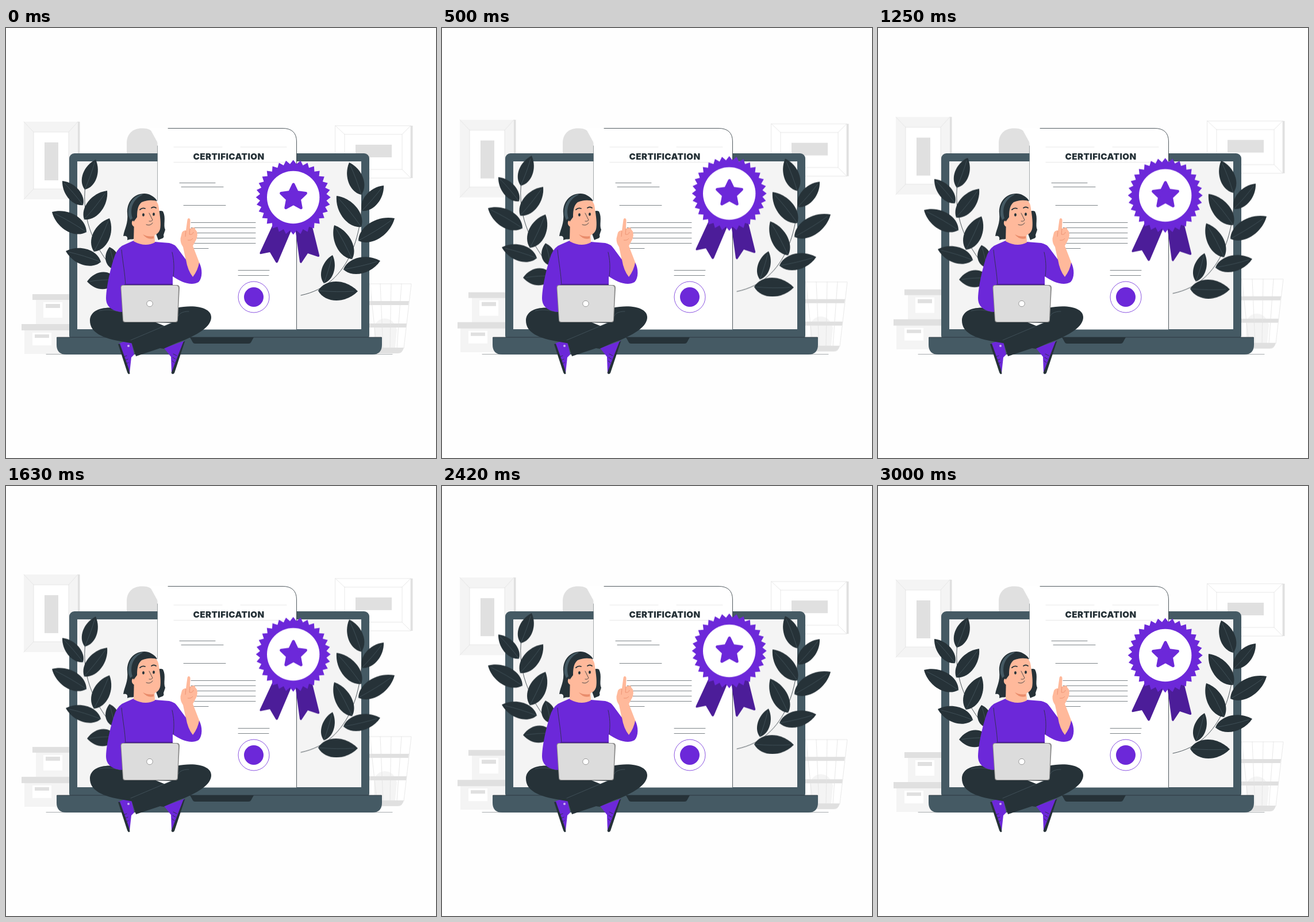
An HTML page for the animation above (3.04 s loop, 748 by 748 pixels).

```html
<!DOCTYPE html>
<html lang="en">
<head>
<meta charset="utf-8">
<title>Certification</title>
<style>
html, body { margin: 0; width: 100%; height: 100%; overflow: hidden; background: #fefefe; }
svg { display: block; width: 100vw; height: 100vh; }
.dark { fill: #263238; }
.slate { fill: #455a64; }
.violet { fill: #6c28d9; }
.deep { fill: #4c1d99; }
.skin { fill: #ffb99b; }
.pale { fill: #f4f4f4; }
.grey { fill: #e0e0e0; }
.white { fill: #fff; }
.ink, .thin, .hair, .brow { fill: none; stroke: #263238; stroke-width: .8; stroke-linecap: round; stroke-linejoin: round; }
.thin { stroke: #e2e2e2; }
.hair { stroke: #51636c; stroke-width: .6; }
.brow { stroke-width: 1.8; }
.faint { stroke-opacity: .5; }
text { font: 900 15.2px Inter, "Open Sans", sans-serif; letter-spacing: .4px; text-anchor: middle; }
</style>
</head>
<body>
<svg viewBox="0 0 748 748">
  <g class="slow">
    <!-- wall pictures -->
    <rect class="grey" x="124" y="163" width="4.5" height="135"/>
    <rect class="pale" x="31" y="163" width="94" height="135"/>
    <rect class="white" x="48" y="181" width="61" height="99"/>
    <path class="thin" d="M31 163L48 181H109L125 163M31 298L48 280V181M109 181V280L125 298M48 280H109"/>
    <rect class="grey" x="67" y="199" width="24" height="66"/>
    <rect class="grey" x="703" y="170" width="4.5" height="91"/>
    <rect class="white" x="573" y="170" width="131" height="91"/>
    <path class="thin" d="M573 170H704V261H573ZL589 185H689V246H589V185M704 170L689 185M573 261L589 246M704 261L689 246"/>
    <rect class="grey" x="608" y="203" width="63" height="22"/>
    <!-- boxes -->
    <path class="pale" d="M52 473H114V516H52ZM32 526H114V567H32Z"/>
    <path class="white" d="M65 477H98V504H65ZM46 530H79V552H46Z"/>
    <path class="grey" d="M46 463H114V473H46ZM27 515H114V526H27ZM69 480H94V487H69ZM50 533H75V539H50Z"/>
    <!-- basket -->
    <path class="white" d="M620 445H705L692 557Q690 566 681 566H620Z"/>
    <path class="pale" d="M640 566V520C644 508 655 503 664 506C673 508 678 517 680 525L676 566Z"/>
    <path class="grey" d="M620 475H701L700 482H620ZM620 514H697L696 521H620ZM620 556H692Q690 566 681 566H620Z"/>
    <path class="thin" d="M620 445H705L692 557M633 445L645 557M651 445L656 557M670 445L668 557M688 445L680 557"/>
  </g>

  <path class="ink faint" d="M70 567.500H672"/>
  <path class="grey" d="M210 224V200C210 184 221 174.500 236 174.500H250L264 200V224Z"/>

  <!-- large laptop -->
  <rect class="slate" x="110" y="218" width="522" height="326" rx="9"/>
  <rect class="pale" x="124" y="232" width="494" height="292"/>
  <path class="slate" d="M88 538H654V551Q654 568 637 568H105Q88 568 88 551Z"/>
  <path class="ink" d="M89 538H653"/>
  <path class="dark" d="M320 538H431L426 547Q425 549 422 549H329Q326 549 325 547Z"/>

  <!-- certificate -->
  <path class="white" d="M236 174H481Q505.500 174 505.500 198V524.500H263.500V201C263 184 252 174 236 174Z"/>
  <path class="ink" d="M282 174.500H481Q505.500 174.500 505.500 198V524"/>
  <path class="ink faint" d="M263.500 300V205"/>
  <path class="thin" d="M292 207H376M408 207H488M292 233.500H488"/>
  <text class="dark" x="387.500" y="228.500">CERTIFICATION</text>
  <path class="ink" stroke-opacity=".75" d="M302 269.500H364M305 276.500H378M309 308.500H382M322 338.500H434M322 347.500H434M322 356.500H434M322 365.500H434M322 374.500H434M322 383.500H352M404 421.500H458M404 430.500H457"/>
  <circle cx="431" cy="468" r="27" fill="none" stroke="#6c28d9" stroke-width=".8"/>
  <circle class="violet" cx="431" cy="468" r="17"/>

  <g class="fast" id="branches">
    <path class="ink" d="M138 275C132 325 147 375 192 426M619 275C623 350 601 447 513 465"/>
  </g>

  <g class="fast">
    <path class="deep" d="M466 338L441.500 391Q441 394 444 393L459 390L469 407Q471 410 473 407L498 348ZM503 348L511 407Q513 411 515 407L525 392L543 398Q546 398 545 395L531 338Z"/>
    <path class="violet" id="rosette"/>
    <circle class="white" cx="499.700" cy="294.500" r="45.700"/>
    <path class="violet" id="star" stroke="#6c28d9" stroke-width="5" stroke-linejoin="round"/>
  </g>

  <!-- shoes and legs -->
  <path class="violet" d="M196 549L217 541L223 568L218 573L215 600H212Z"/>
  <path class="dark" d="M195 550L198 549L214 594L215.500 601Q213 604 211 599Z"/>
  <circle cx="213" cy="553" r="2" fill="#c9b0f2"/>
  <path class="violet" d="M275 557L311 544L292 600H288L287 572Z"/>
  <path class="dark" d="M308.500 546L311.500 544L293 600Q290 604 287.500 600L289 596Z"/>
  <path class="ink" d="M205 572L210 570M207 578L212 576M209 584L213 582M291 567L297 570M290 573L295 576M289 579L293 582"/>
  <path class="dark" d="M203 489C170 482 146 490 146 509C146 530 168 540 205 546L274 558L307 543L280 520Z"/>
  <path class="dark" d="M296 487C330 480 357 487 357 503C357 519 337 531 310 543L226 571L217 543L288 513L200 511V490Z"/>
  <path class="hair" d="M217 543L288 513M162 492C178 488 190 492 199 494M318 493C306 493 301 497 298 503"/>

  <!-- raised arm -->
  <path class="skin" d="M313 352L315.500 334Q316 330.500 318.500 331Q321 332 320.500 336L320 349L326 347Q329 347 329 350L332 354Q334 361 331 368L325 379L337 410L332 440L314 430L312 400L308 381Q303 374 303.500 366L306 356Q308 352 313 352Z"/>
  <path d="M313 353L312 363M320 349L319 359Q325 360 326 355M316 369Q322 370 325 366" fill="none" stroke="#e98c6b" stroke-width=".8"/>

  <!-- shirt -->
  <path class="violet" d="M224 369Q242 380 259 372L284 374Q294 376 299 384L313 403Q316 422 325 433Q334 421 336 408C342 419 342 435 335 442C323 449 306 443 290 432V455H202V494C188 493 174 487 174 470C175 446 183 413 190 394Q196 380 208 376Z"/>
  <path class="ink" d="M201 386C203 407 207 426 208 449M291 432C293 415 292 403 289 390"/>
  <path class="deep" d="M207 445H290V450H203Z"/>

  <!-- head -->
  <path class="dark" d="M241 288C221 288 210 304 211 322C213 340 206 349 204 362C210 361 212 363 211 369C217 366 220 369 224 366L260 355L265 369C271 365 276 367 274 360L277 351C273 343 279 330 273 319Q269 317 265 319C266 304 257 288 241 288Z"/>
  <path class="skin" d="M223 332L222 371Q242 382 259 373L258 352L236 328Z"/>
  <path class="skin" d="M223 335C227 323 227 308 236 302Q246 298 260 300Q265 304 266 314C268 327 270 341 268 350C265 360 255 363 245 361Q233 358 230 346Q221 348 219 341Q218 334 223 335Z"/>
  <path class="dark" d="M222 337L228 329C228 315 230 308 236 303Q250 297 263 301Q256 289 240 289C225 290 217 304 218 319Z"/>
  <path class="slate" d="M238 289C219 292 211 310 213 326L216 334L220 331C215 315 220 299 236 291Z"/>
  <path d="M238 359Q247 364 257 362V366Q246 369 238 359Z" fill="#e98c6b"/>
  <ellipse class="dark" cx="239" cy="325" rx="1.900" ry="2.800"/>
  <ellipse class="dark" cx="257" cy="324" rx="1.900" ry="2.800"/>
  <path class="brow" d="M233 316Q237 312 242 314M253 313Q257 310 261 313"/>
  <path class="ink" d="M249 322L255 334Q253 337 249 336M244 342Q251 345 255 339"/>

  <!-- small laptop -->
  <path d="M204 447H297Q302 447 302 452L299 508Q299 512 295 512H207Q203 512 203 508L199.500 452Q199 447 204 447Z" fill="#8a8a8a"/>
  <path d="M204 448H295Q300 448 300 453L298 507Q298 511 294 511H208Q204 511 204 507L200.500 453Q200 448 204 448Z" fill="#dcdcdc"/>
  <circle class="white" cx="250" cy="479.500" r="5.200" stroke="#777" stroke-width=".7"/>
</svg>
<script>
const LOOP = 3040, LIFT = 10;
const $ = id => document.getElementById(id);

// base x, base y, tip x, tip y, bulge
const leaves = [
  [137, 281, 156, 229, 15], [134, 308, 98, 266, 14], [136, 333, 176, 283, 17], [140, 355, 80, 320, 19],
  [153, 389, 180, 331, 18], [165, 407, 104, 388, 17], [189, 420, 180, 381, 14], [192, 438, 141, 441, 18],
  [618, 290, 597, 234, 16], [618, 346, 575, 292, 18], [619, 318, 657, 274, 15], [613, 370, 676, 331, 19],
  [602, 402, 571, 343, 17], [587, 420, 651, 405, 17], [553, 444, 568, 395, 13], [543, 457, 612, 458, 20]
];

function draw(parent, cls, d) {
  const p = document.createElementNS("http://www.w3.org/2000/svg", "path");
  p.setAttribute("class", cls);
  p.setAttribute("d", d);
  parent.append(p);
}

for (const [x, y, u, v, w] of leaves) {
  const dx = u - x, dy = v - y, len = Math.hypot(dx, dy);
  const at = (k, side) => `${x + dx * k - dy / len * w * side} ${y + dy * k + dx / len * w * side}`;
  draw($("branches"), "dark",
    `M${x} ${y}C${at(.18, 1.1)} ${at(.7, 1.1)} ${u} ${v}C${at(.7, -1.1)} ${at(.18, -1.1)} ${x} ${y}Z`);
  draw($("branches"), "hair", `M${x} ${y}Q${at(.5, .12)} ${at(.9, 0)}`);
}

// closed ring alternating between an outer and an inner radius
function spikes(cx, cy, n, outer, inner) {
  const pts = Array.from({ length: n * 2 }, (_, i) => {
    const a = Math.PI * i / n - Math.PI / 2, r = i % 2 ? inner : outer;
    return `${cx + r * Math.cos(a)} ${cy + r * Math.sin(a)}`;
  });
  return `M${pts.join("L")}Z`;
}
$("rosette").setAttribute("d", spikes(499.7, 294.5, 32, 65, 58));
$("star").setAttribute("d", spikes(500, 294.5, 5, 22.5, 11));

function float(selector, times) {
  const steps = times.map((t, i) => ({
    offset: t / LOOP,
    transform: `translateY(${i % 2 ? -LIFT : 0}px)`
  }));
  steps.push({ offset: 1, transform: "translateY(0px)" });
  document.querySelectorAll(selector).forEach(el =>
    el.animate(steps, { duration: LOOP, iterations: Infinity }));
}
float(".slow", [0, 1500, 3000]);
float(".fast", [0, 750, 1500, 2250, 3000]);
</script>
</body>
</html>
```
